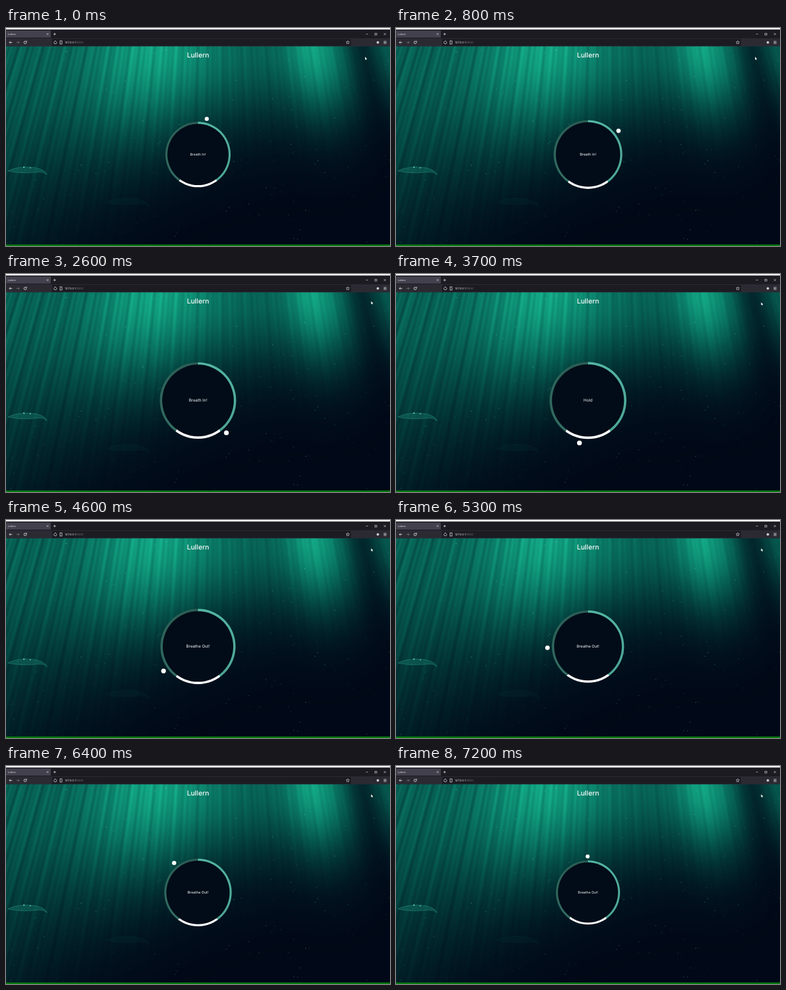
Animation of 600 by 340 pixels, one loop 7.3 s. Source, as an HTML page with a canvas:

```html
<!DOCTYPE html>
<html lang="en">
<head>
<meta charset="utf-8">
<title>Lullern</title>
<style>
  html, body { margin: 0; width: 100%; height: 100%; overflow: hidden; background: #010d1a; }
  canvas { display: block; width: 600px; height: 340px; }
</style>
</head>
<body>
<canvas id="stage" width="600" height="340"></canvas>
<script>
const W = 600, H = 340, LOOP = 7300, STEP = 100;
const CYCLE = 7500, GROW = 3000, HOLD = 1500, PHASE = 288;
const CX = 300, CY = 197.3, TAU = Math.PI * 2;
const SURFACE = 28, DEPTH = 310;
const FONT = 'Inter, "Open Sans", sans-serif';
const NAME = 'Lullern';
const LIGHT = '#e8e8ec', DIM = '#77767f';

const stage = document.getElementById('stage').getContext('2d');
const backdrop = document.createElement('canvas');
backdrop.width = W;
backdrop.height = H;

const bell = (x, center, width) => Math.exp(-(((x - center) / width) ** 2));

function rng(seed) {
  return () => (seed = (seed * 16807) % 2147483647) / 2147483647;
}

function smooth(t, from, to) {
  const u = Math.min(1, Math.max(0, (t - from) / (to - from)));
  return u * u * (3 - 2 * u);
}

function rect(c, color, x, y, w, h) {
  c.fillStyle = color;
  c.fillRect(x, y, w, h);
}

function disc(c, x, y, r, fill) {
  c.fillStyle = fill;
  c.beginPath();
  c.arc(x, y, r, 0, TAU);
  c.fill();
}

function line(c, color, width, ...points) {
  c.strokeStyle = color;
  c.lineWidth = width;
  c.beginPath();
  points.forEach(([x, y]) => c.lineTo(x, y));
  c.stroke();
}

function label(c, text, x, y, size, color, weight = 400, align = 'left') {
  c.font = `${weight} ${size}px ${FONT}`;
  c.textRendering = 'geometricPrecision';
  c.textAlign = align;
  c.fillStyle = color;
  c.fillText(text, x, y);
}

// Light enters at the surface, fans out around x = 330 and fades with depth.
function lightAt(x, y) {
  const u = 330 + (x - 330) / (1 + (y - SURFACE) / 1000);
  const surface = 0.56 + 0.42 * bell(u, 232, 92) + 0.42 * bell(u, 477, 38) - 0.36 * bell(u, 555, 28);
  const reach = 0.32 + 0.53 * Math.exp(-x / 180);
  const streaks = Math.sin(u * 0.29) + Math.sin(u * 0.47 + 2) + Math.sin(u * 0.83 + 1);
  const depth = (y - SURFACE) / DEPTH;
  return surface * bell(depth, 0, reach) * (1 + 0.09 * streaks * Math.exp(-u / 400));
}

function drawWater(c) {
  const image = c.createImageData(W, DEPTH);
  for (let i = 0; i < W * DEPTH; i++) {
    const light = lightAt(i % W, SURFACE + Math.floor(i / W));
    image.data.set([1 + 17 * light * light, 8 + 156 * light, 23 + 108 * light, 255], i * 4);
  }
  c.putImageData(image, 0, SURFACE);
}

function drawSpecks(c) {
  const random = rng(1907);
  for (let i = 0; i < 520; i++) {
    const x = random() * W, y = 31 + random() * 304;
    const alpha = 0.1 + 0.6 * random() ** 4;
    disc(c, x, y, 0.35 + 0.5 * random(), `rgba(110,220,190,${alpha * (1 - y / 700)})`);
  }
}

function drawWhale(c, x, y, size, turn, alpha) {
  c.save();
  c.translate(x, y);
  c.rotate(turn);
  c.scale(size, size);
  c.globalAlpha = alpha;
  c.beginPath();
  c.moveTo(-30, 3);
  c.bezierCurveTo(-14, -6, 26, -6, 31, 9);
  c.bezierCurveTo(22, -1, 8, 11, -30, 3);
  c.fillStyle = 'rgba(20,110,98,.5)';
  c.fill();
  c.strokeStyle = 'rgba(50,165,140,.55)';
  c.lineWidth = 0.7;
  c.stroke();
  c.restore();
}

function drawAnimals(c) {
  drawWhale(c, 33, 220, 1, 0, 1);
  drawWhale(c, 224, 110, 0.42, 1.05, 0.6);
  drawWhale(c, 46, 237, 0.11, -0.6, 1);
  drawWhale(c, 190, 269, 1.1, 0, 0.13);
  disc(c, 28, 217, 1.1, '#70dabb');
  disc(c, 38, 218, 0.9, '#62cbae');
}

function drawTabs(c) {
  const cross = (x, r) => {
    line(c, LIGHT, 0.6, [x - r, 9.5 - r], [x + r, 9.5 + r]);
    line(c, LIGHT, 0.6, [x - r, 9.5 + r], [x + r, 9.5 - r]);
  };
  rect(c, '#fff', 0, 0, W, 2.5);
  rect(c, '#1c1b22', 0, 2.5, W, 13.5);
  rect(c, '#42414d', 0, 4, 70, 11);
  label(c, NAME, 3, 11, 3.8, LIGHT);
  cross(65, 1.4);
  line(c, LIGHT, 0.7, [74, 9.5], [78, 9.5]);
  line(c, LIGHT, 0.7, [76, 7.5], [76, 11.5]);
  line(c, LIGHT, 0.6, [562.5, 9.5], [565.5, 9.5]);
  c.strokeRect(576.6, 8.2, 2.8, 2.8);
  cross(592, 1.6);
}

function drawToolbar(c) {
  const y = 22.5;
  const arrow = (x, way, color) => {
    const tip = x + way * 2.3, notch = x + way * 0.4;
    line(c, color, 0.8, [x - way * 2.3, y], [tip, y]);
    line(c, color, 0.8, [notch, y - 2], [tip, y], [notch, y + 2]);
  };
  rect(c, '#2b2a33', 0, 16, W, 12.6);
  rect(c, '#1c1b22', 72, 17, 467, 11);

  arrow(7.5, -1, LIGHT);
  arrow(18.5, 1, DIM);
  c.strokeStyle = LIGHT;
  c.beginPath();
  c.arc(30, y, 2, 0, TAU * 0.83);
  c.stroke();
  line(c, LIGHT, 0.8, [32.3, 19.8], [32.3, 21.6], [30.5, 21.6]);

  c.lineWidth = 0.7;
  c.beginPath();
  c.arc(77, y, 2.3, 0, Math.PI);
  c.lineTo(77, 19.8);
  c.closePath();
  c.stroke();
  c.strokeRect(84.5, 20, 3, 5);
  label(c, '127.0.0.1', 92, 24.2, 4.4, LIGHT);
  label(c, ':5500', 92 + c.measureText('127.0.0.1').width, 24.2, 4.4, DIM);

  const star = Array.from({ length: 11 }, (_, i) => {
    const r = i % 2 ? 1.3 : 2.7, a = i * Math.PI / 5;
    return [534 + r * Math.sin(a), y - r * Math.cos(a)];
  });
  line(c, LIGHT, 0.6, ...star);
  disc(c, 581, y, 1.9, '#cfcfd8');
  for (let i = -1; i <= 1; i++) line(c, LIGHT, 0.7, [590, y + i * 1.7], [594.5, y + i * 1.7]);
}

function drawBackdrop() {
  const c = backdrop.getContext('2d');
  drawWater(c);
  drawAnimals(c);
  drawSpecks(c);
  drawTabs(c);
  drawToolbar(c);
  rect(c, '#087a10', 0, 337.6, W, 2.4);
  label(c, NAME, CX, 45.5, 10.6, '#fff', 500, 'center');
}

function breathing(phase) {
  if (phase < GROW) return ['Breath In!', 1 + 0.2 * phase / GROW];
  if (phase < GROW + HOLD) return ['Hold', 1.2];
  return ['Breathe Out!', 1.2 - 0.2 * (phase - GROW - HOLD) / GROW];
}

function drawRing(c, phase) {
  const [text, scale] = breathing(phase);
  const angle = phase / CYCLE * TAU;
  const ring = c.createConicGradient(-Math.PI / 2, 0, 0);
  const arc = (from, to, first, last) => {
    ring.addColorStop(from, first);
    ring.addColorStop(to, last);
  };
  arc(0, 0.4, '#55b7a4', '#4ca493');
  arc(0.4, 0.6, '#fff', '#fff');
  arc(0.6, 1, '#336d62', '#2a5b52');

  c.save();
  c.translate(CX, CY);
  c.scale(scale, scale);
  disc(c, 0, 0, 50, ring);
  disc(c, 0, 0, 46.9, '#010c18');
  label(c, text, 0, 1.7, 5.3, '#fff', 400, 'center');
  disc(c, 56.25 * Math.sin(angle), -56.25 * Math.cos(angle), 3.125, '#fff');
  c.restore();
}

// The pointer swings out to the right edge and settles near its start.
function drawCursor(c, t) {
  const swing = smooth(t, 1600, 2400);
  c.save();
  c.translate(561 + 9.5 * swing + 29 * Math.sin(Math.PI * swing),
    45 - 2.5 * swing + 1.7 * smooth(t, 3200, 3400));
  c.fillStyle = '#fff';
  c.beginPath();
  c.lineTo(0, 0);
  c.lineTo(0, 4.4);
  c.lineTo(3, 3.1);
  c.fill();
  line(c, '#fff', 0.8, [1, 2.5], [2.1, 4.9]);
  c.restore();
}

function render(now) {
  const t = Math.floor(now % LOOP / STEP) * STEP;
  stage.drawImage(backdrop, 0, 0);
  drawRing(stage, (t + PHASE) % CYCLE);
  drawCursor(stage, t);
}

drawBackdrop();
const start = performance.now();
function tick() {
  render(performance.now() - start);
  requestAnimationFrame(tick);
}
tick();
</script>
</body>
</html>
```
